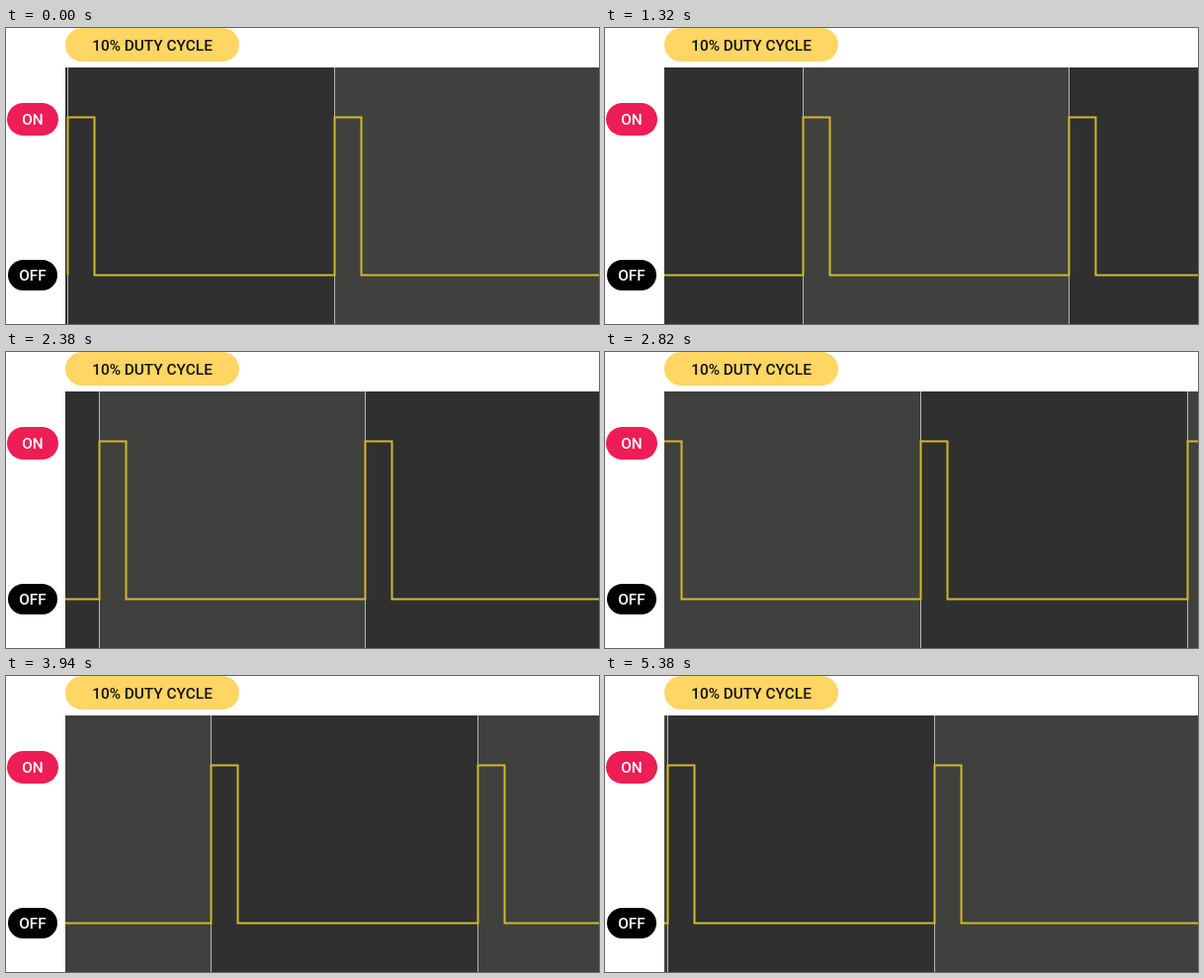
Animation of 600 by 300 pixels, one loop 5400 ms. Source, as an HTML page with a canvas:

```html
<!DOCTYPE html>
<html lang="en">
<head>
<meta charset="utf-8">
<title>10% duty cycle</title>
<style>
  html, body { margin: 0; width: 100%; height: 100%; overflow: hidden; background: #fff; }
  canvas, svg { position: absolute; left: 0; top: 0; width: 600px; height: 300px; }
  text { font: 500 15.4px Roboto, sans-serif; text-anchor: middle; }
</style>
</head>
<body>
<canvas id="plot" width="600" height="300"></canvas>
<svg viewBox="0 0 600 300">
  <rect x="60" y="0" width="176" height="34" rx="17" fill="#ffd564"/>
  <text x="148" y="22.5" fill="#111">10% DUTY CYCLE</text>
  <rect x="1" y="76" width="52" height="33" rx="16.5" fill="#ec1e55"/>
  <text x="27" y="98" fill="#fff">ON</text>
  <rect x="2" y="235" width="50" height="31" rx="15.5" fill="#000"/>
  <text x="27" y="256" fill="#fff">OFF</text>
</svg>
<script>
const ctx = document.getElementById('plot').getContext('2d');
const LOOP = 5400, STEP = 20, SHIFT = 2;
const LEFT = 60, TOP = 40, RIGHT = 600, BOTTOM = 300;
const HIGH = 90.5, LOW = 250.5, PULSE = 27;
const STARTS = [0, 270, 539, 809, 1078];   // cycle starts along the strip
const BANDS = ['#303030', '#40403e'];

function draw(time) {
  const origin = 62 - Math.floor(time % LOOP / STEP) * SHIFT;
  const edges = STARTS.map(s => origin + s);

  ctx.save();
  ctx.beginPath();
  ctx.rect(LEFT, TOP, RIGHT - LEFT, BOTTOM - TOP);
  ctx.clip();

  ctx.fillStyle = BANDS[0];
  ctx.fillRect(LEFT, TOP, RIGHT - LEFT, BOTTOM - TOP);
  edges.forEach((x, i) => {
    ctx.fillStyle = BANDS[i % 2];
    ctx.fillRect(x, TOP, 271, BOTTOM - TOP);
  });

  ctx.fillStyle = '#b8b8b4';
  edges.forEach(x => ctx.fillRect(x, TOP, 1, BOTTOM - TOP));

  ctx.beginPath();
  edges.forEach(edge => {
    const x = edge + 0.5;
    ctx.lineTo(x, LOW);
    ctx.lineTo(x, HIGH);
    ctx.lineTo(x + PULSE, HIGH);
    ctx.lineTo(x + PULSE, LOW);
  });
  ctx.strokeStyle = '#d0b82e';
  ctx.lineWidth = 2;
  ctx.stroke();
  ctx.restore();
}

const begin = performance.now();
function tick() {
  draw(performance.now() - begin);
  requestAnimationFrame(tick);
}
tick();
</script>
</body>
</html>
```
